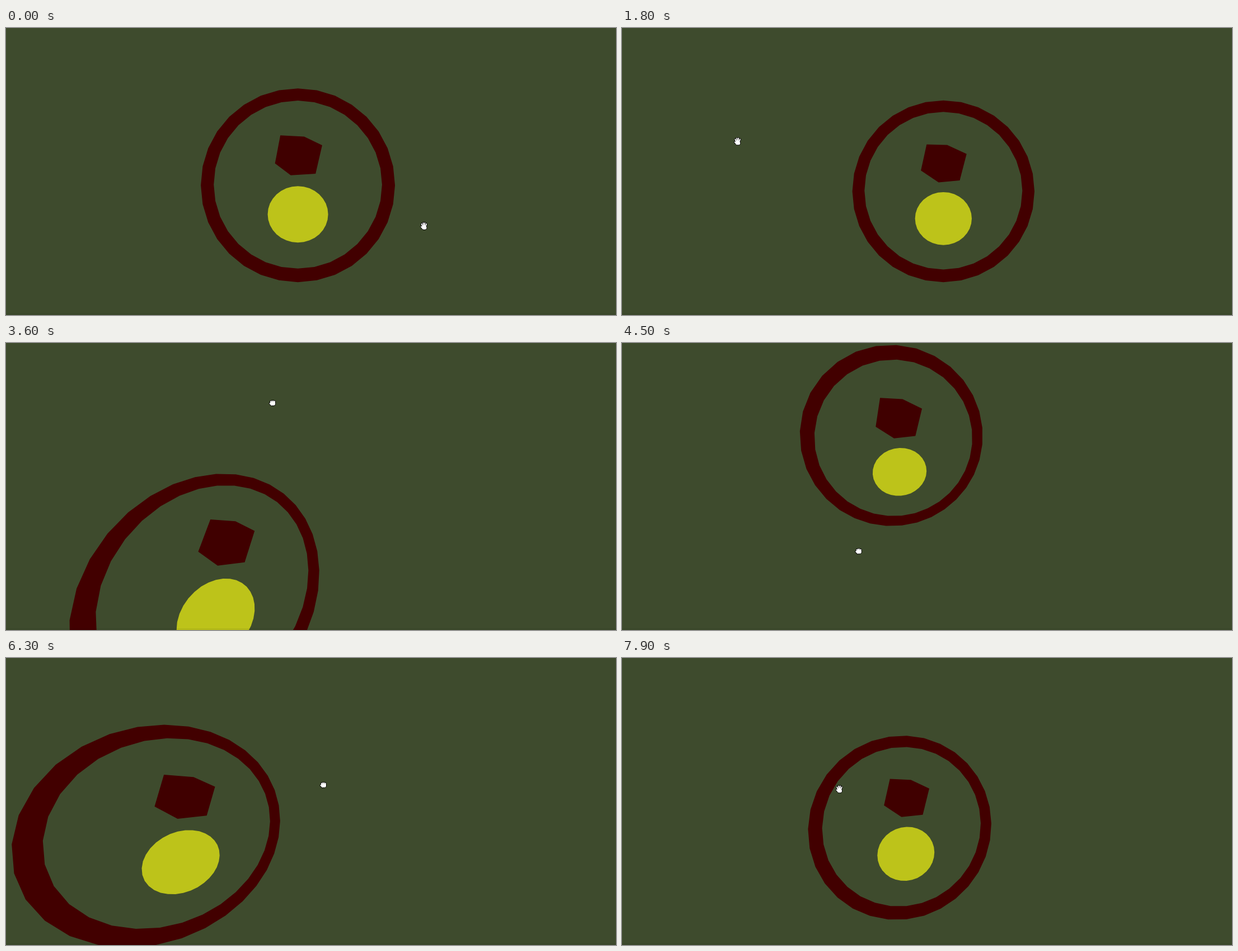
An HTML page with a canvas that plays this animation: 1090x514 px, repeating every 8000 ms.

```html
<!DOCTYPE html>
<html lang="en">
<head>
<meta charset="utf-8">
<title>Look around</title>
<style>
  html, body { margin: 0; width: 100%; height: 100%; overflow: hidden; background: #3e4b2d; }
  canvas { display: block; }
</style>
</head>
<body>
<canvas id="view" width="1090" height="514"></canvas>
<script>
const ctx = document.getElementById('view').getContext('2d');
const LOOP = 8000, FOCAL = 347, CX = 532, CY = 223;
const GROUND = '#3e4b2d', RING = '#420000', BOX = '#400000', YELLOW = '#bdc31a';
const GRAB = 2000, RELEASE = 7900;

const rad = deg => deg * Math.PI / 180;
const ramp = (t, from, to) => Math.min(1, Math.max(0, (t - from) / (to - from)));
const mix = (a, b, p) => a.map((v, i) => v + (b[i] - v) * p);

// The picture holds between ticks: runs of first, last, step
const ticks = [
  [0, 100, 100], [400, 700, 300], [800, 2000, 100], [2300, 2600, 100], [3100, 3400, 300],
  [3600, 4200, 200], [4500, 4800, 300], [5000, 5600, 300], [5900, 7900, 200]
].flatMap(([from, to, step]) =>
  Array.from({ length: (to - from) / step + 1 }, (_, i) => from + i * step));

// Turning points of the drag: time, yaw, pitch
const turns = [
  [GRAB, 0, 0], [2600, 29.9, -.6], [3100, 34.7, 18], [3600, 23.4, 19.3], [4300, 18, -18],
  [4900, -2, -3], [5300, 11.5, 3.5], [5700, 18, -18], [6300, 33, 3.1], [6700, 8, 10],
  [7100, 8, -18], [7500, 27, 3], [RELEASE, 9.3, 2]
];

// Smooth curve through the turning points
function lookAt(t) {
  const last = turns.length - 1;
  const i = Math.min(last - 1, Math.max(0, turns.filter(k => k[0] <= t).length - 1));
  const [a, b, c, d] = [-1, 0, 1, 2].map(n => turns[Math.min(last, Math.max(0, i + n))]);
  const p = ramp(t, b[0], c[0]);
  return [1, 2].map(n => b[n] + p / 2 * (c[n] - a[n]
    + p * (2 * a[n] - 5 * b[n] + 4 * c[n] - d[n] + p * (3 * (b[n] - c[n]) + d[n] - a[n]))));
}

// The camera sits a little ahead of the point it turns about
const orbit = yaw => [
  .39 - .514 * Math.sin(yaw), -.64 + .22 * Math.sin(yaw), 3.712 - .514 * Math.cos(yaw)
];
const dragPointer = (yaw, pitch) => [320 + 7.6 * yaw - 1.1 * pitch, 250 - 7.4 * pitch];

function poseAt(time) {
  const t = ticks.filter(v => v <= time).pop();
  const [yaw, pitch] = lookAt(t);
  const strafe = [-.09 + .406 * ramp(t, 0, 700), -.507, 3];
  const sweep = mix([747, 355], [150, 180], ramp(t, 800, 1700));
  return {
    yaw: rad(yaw),
    pitch: rad(pitch),
    offset: mix(strafe, orbit(rad(yaw)), ramp(t, 800, 1300)),
    pointer: mix(sweep, dragPointer(yaw, pitch), ramp(t, 1700, GRAB)),
    closed: t > GRAB && t < RELEASE
  };
}

function project({ yaw, pitch, offset }, [px, py, pz = 0]) {
  const x = px + offset[0], y = py + offset[1], z = pz + offset[2];
  const side = x * Math.cos(yaw) - z * Math.sin(yaw);
  const ahead = x * Math.sin(yaw) + z * Math.cos(yaw);
  const up = y * Math.cos(pitch) - ahead * Math.sin(pitch);
  const depth = y * Math.sin(pitch) + ahead * Math.cos(pitch);
  return [CX + FOCAL * side / depth, CY - FOCAL * up / depth];
}

const ellipse = (rx, ry, y = 0) => Array.from({ length: 32 }, (_, i) => {
  const a = i * Math.PI / 16;
  return [rx * Math.cos(a), y + ry * Math.sin(a)];
});
const ring = [ellipse(1.5, 1.5), ellipse(1.3, 1.3, .01)];
const disc = [ellipse(.467, .4366, -.45)];

// Half of the box outline; the other half is its mirror through the centre
const corners = [[-.275, .3, 0], [.098, .298, .22], [.37, .142, -.08]];
const box = [[1, -1].flatMap(s => corners.map(([x, y, z]) => [s * x, .475 + s * y, .03 + s * z]))];

function fillShape(pose, outlines, color) {
  ctx.beginPath();
  for (const points of outlines) {
    points.forEach((p, i) => ctx[i ? 'lineTo' : 'moveTo'](...project(pose, p)));
    ctx.closePath();
  }
  ctx.fillStyle = color;
  ctx.fill('evenodd');
}

// Four fanned fingers and a thumb, short when the hand is closed
function drawHand([x, y], closed) {
  ctx.save();
  ctx.translate(x, y);
  ctx.lineCap = 'round';
  for (const [color, grow] of [['#000', .9], ['#fff', 0]]) {
    ctx.strokeStyle = ctx.fillStyle = color;
    ctx.lineWidth = 2 + 2 * grow;
    ctx.beginPath();
    for (let i = -1.5; i < 2; i++) {
      ctx.moveTo(i * (closed ? 2.3 : 2.8), (closed ? -3.3 : -6) + i * i * (closed ? .3 : .9));
      ctx.lineTo(i * (closed ? 2.3 : 1.4), 2);
    }
    ctx.moveTo(-5, 1);
    ctx.lineTo(-2, 4);
    ctx.stroke();
    ctx.beginPath();
    ctx.ellipse(.4, closed ? 1.6 : 2.8, 4.2 + grow, 3.2 + grow, 0, 0, 7);
    ctx.fill();
  }
  ctx.restore();
}

function draw(now) {
  const pose = poseAt(now % LOOP);
  ctx.fillStyle = GROUND;
  ctx.fillRect(0, 0, 1090, 514);
  fillShape(pose, ring, RING);
  fillShape(pose, box, BOX);
  fillShape(pose, disc, YELLOW);
  ctx.fillStyle = 'rgba(0,0,0,.06)';
  ctx.fillRect(0, 511, 1090, 3);
  drawHand(pose.pointer, pose.closed);
}

const start = performance.now();
(function loop() {
  draw(performance.now() - start);
  requestAnimationFrame(loop);
})();
</script>
</body>
</html>
```
